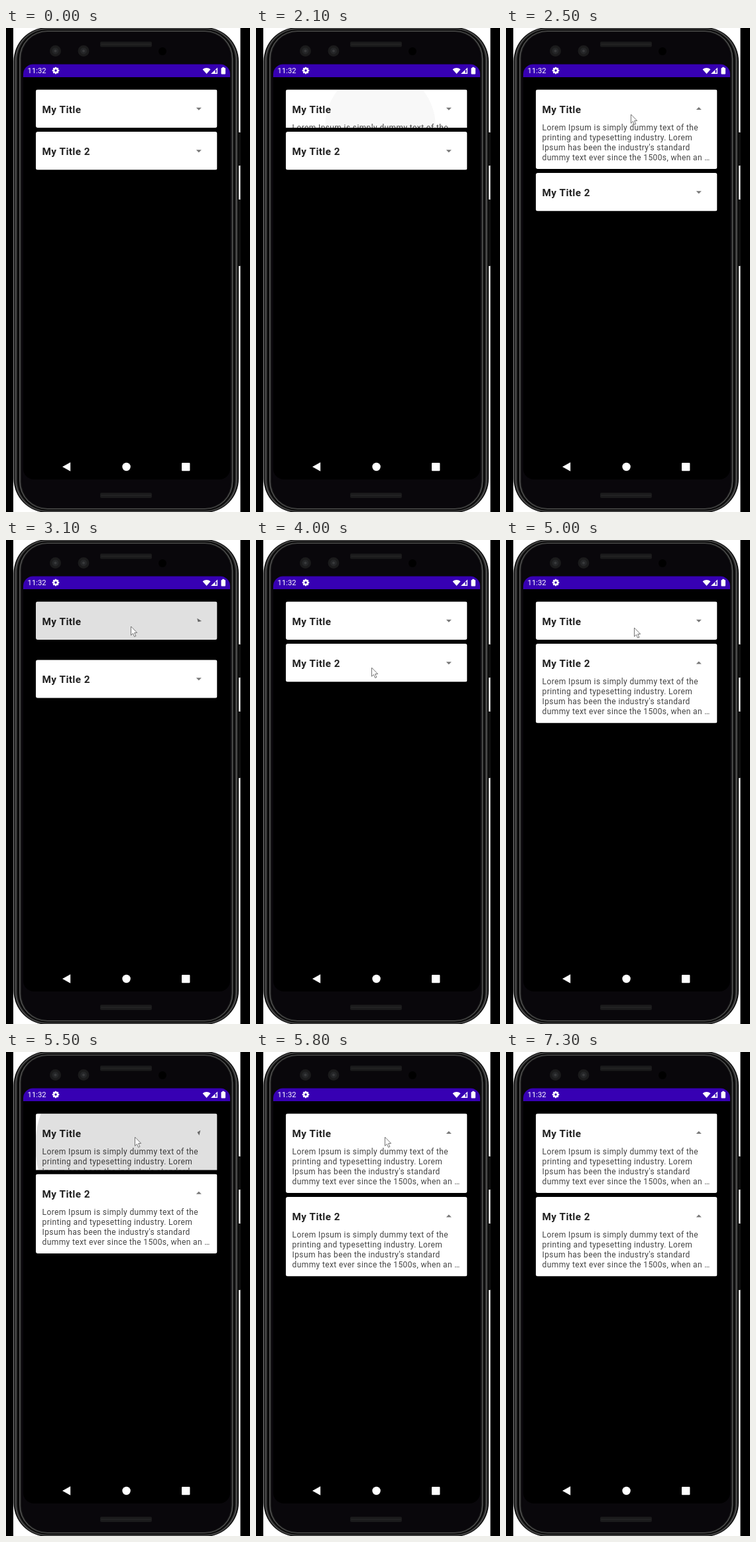
Animation, 368 px wide and 728 px high, one loop 7400 ms. Source, as an HTML page with a canvas:

```html
<!DOCTYPE html>
<html lang="en">
<head>
<meta charset="utf-8">
<title>Expandable cards</title>
<style>
  html, body { margin: 0; width: 100%; height: 100%; overflow: hidden; background: #000; }
  canvas { display: block; width: 368px; height: 728px; }
</style>
</head>
<body>
<canvas id="stage" width="368" height="728"></canvas>
<script>
const ctx = document.getElementById('stage').getContext('2d');
const LOOP = 7400, STEP = 100;
const LEFT = 45, WIDTH = 273.5, TOP = 92.5, SHORT = 57.5, TALL = 119.5, GAP = 6;
const LINES = [
  'Lorem Ipsum is simply dummy text of the',
  'printing and typesetting industry. Lorem',
  "Ipsum has been the industry's standard",
  'dummy text ever since the 1500s, when an …'
];
// Each tap: when the finger goes down, when it lets go, and where.
const CARDS = [
  { title: 'My Title', taps: [
    { down: 2082, up: 2100, x: 188, y: 146 },
    { down: 2880, up: 3018, x: 188, y: 130 },
    { down: 5380, up: 5450, x: 194, y: 128 }] },
  { title: 'My Title 2', taps: [
    { down: 4030, up: 4105, x: 174, y: 192 }] }
];
// Pointer path: time, x, y
const PATH = [
  [2200, 188, 130], [3500, 188, 130], [3900, 174, 192], [4700, 174, 192],
  [5000, 193, 132], [5200, 194, 128], [6100, 194, 128], [6300, 165, 150],
  [6450, 112, 200], [6600, 170, 247], [6800, 234, 230]
];

const clamp = v => Math.max(0, Math.min(1, v));
const mix = (a, b, k) => a + (b - a) * k;

function bezier(x1, y1, x2, y2) {
  const at = (a, b, s) => 3 * (1 - s) * (1 - s) * s * a + 3 * (1 - s) * s * s * b + s * s * s;
  return x => {
    if (x <= 0 || x >= 1) return clamp(x);
    let lo = 0, hi = 1;
    for (let i = 0; i < 24; i++) {
      const mid = (lo + hi) / 2;
      if (at(x1, x2, mid) < x) lo = mid; else hi = mid;
    }
    return at(y1, y2, lo);
  };
}
const slowIn = bezier(0, 0, 0.2, 1);
const fastOut = bezier(0.4, 0, 0.2, 1);
// Critically damped spring, from 0 to 1
const spring = ms => { const k = 0.0387 * ms; return 1 - (1 + k) * Math.exp(-k); };

function fillBox(x, y, w, h, r, fill) {
  ctx.beginPath();
  ctx.roundRect(x, y, w, h, r);
  ctx.fillStyle = fill;
  ctx.fill();
}
function disc(x, y, r, fill) {
  ctx.beginPath();
  ctx.arc(x, y, r, 0, Math.PI * 2);
  ctx.fillStyle = fill;
  ctx.fill();
}
function poly(points, fill) {
  ctx.beginPath();
  points.forEach(([x, y]) => ctx.lineTo(x, y));
  ctx.closePath();
  ctx.fillStyle = fill;
  ctx.fill();
}
function label(text, x, y, font, fill, spacing = 0) {
  ctx.font = font;
  ctx.letterSpacing = spacing + 'px';
  ctx.fillStyle = fill;
  ctx.fillText(text, x, y);
}

function drawPhone() {
  fillBox(0, 0, 368, 728, 0, '#000');
  fillBox(11, 0, 342.5, 728, 0, '#fff');
  fillBox(350, 157, 4, 50, 1, '#111');
  fillBox(350, 258, 4, 100, 1, '#111');
  // Rim, as nested shells from the outside in
  const shells = [[0, '#0c0c0c'], [2, '#4a4a4a'], [4.5, '#1c1c1c'], [6, '#080808'],
    [8.5, '#555'], [10, '#222'], [11.5, '#09070b']];
  for (const [d, fill] of shells) {
    fillBox(11.5 + d, -1 + d * 0.6, 339.5 - 2 * d, 730 - d * 1.2, 51 - d, fill);
  }
  for (const y of [20.5, 699]) {
    fillBox(142, y, 78, 8, 2, '#1a1a1b');
    fillBox(143, y + 3, 76, 2, 1, '#222223');
  }
  for (const x of [74.5, 117]) {
    disc(x, 34.5, 8.5, '#1b1b1c');
    disc(x, 34.5, 5, '#252628');
    disc(x, 34.5, 2, '#38393b');
  }
  disc(236, 35, 6, '#000');
  fillBox(26, 54.4, 312, 624.6, 16, '#000');
}

function drawStatus() {
  fillBox(26, 54.4, 312, 19.6, [15, 15, 0, 0], '#3700b3');
  label('11:32', 32.6, 68.4, '11.2px Roboto, sans-serif', '#fff');
  for (let i = 0; i < 4; i++) {
    ctx.save();
    ctx.translate(75, 64);
    ctx.rotate(i * Math.PI / 4);
    fillBox(-1.2, -5.2, 2.4, 10.4, 0.5, '#fff');
    ctx.restore();
  }
  disc(75, 64, 3.9, '#fff');
  disc(75, 64, 1.7, '#3700b3');
  ctx.beginPath();
  ctx.moveTo(302.5, 69);
  ctx.arc(302.5, 69, 9, -Math.PI * 0.73, -Math.PI * 0.27);
  ctx.closePath();
  ctx.fillStyle = '#fff';
  ctx.fill();
  poly([[309, 69], [319, 59.5], [319, 69]], '#fff');
  fillBox(315.5, 63, 2, 4.5, 0, '#3700b3');
  fillBox(324.5, 60, 6.5, 9.5, 1, '#fff');
  fillBox(326.2, 58.8, 3, 2, 0, '#fff');
}

function drawNav() {
  poly([[85, 660], [97.2, 653.3], [97.2, 666.7]], '#fff');
  disc(181.6, 660, 6.2, '#fff');
  fillBox(265, 654, 12.4, 12.2, 1, '#fff');
}

function cardState(card, t) {
  const done = card.taps.filter(tap => t >= tap.up);
  const open = done.length % 2 === 1;
  if (!done.length) return { open, slot: SHORT, angle: 0 };
  const age = t - done[done.length - 1].up;
  const [from, to] = open ? [0, 1] : [1, 0];
  return {
    open,
    slot: mix(SHORT, TALL, mix(from, to, slowIn(age / 300))),
    angle: Math.PI * mix(from, to, spring(age))
  };
}

function drawRipple(tap, t, y, h) {
  const age = t - tap.down;
  if (age < 0 || age > 375) return;
  const alpha = 0.12 * clamp(age / 75) * (1 - clamp((age - 225) / 150));
  const move = clamp(age / 225);
  const full = Math.hypot(WIDTH / 2, h / 2) + 8;
  disc(mix(tap.x, LEFT + WIDTH / 2, move), mix(tap.y, y + h / 2, move),
    mix(WIDTH * 0.3, full, fastOut(move)), `rgba(0,0,0,${alpha})`);
}

function drawCard(card, y, t) {
  const { open, slot, angle } = cardState(card, t);
  const h = open ? TALL : SHORT;
  ctx.save();
  ctx.beginPath();
  ctx.rect(LEFT, y, WIDTH, slot);
  ctx.clip();
  fillBox(LEFT, y, WIDTH, h, 3, '#fff');
  ctx.clip();
  label(card.title, 54.5, y + 35.3, 'bold 15.3px Roboto, sans-serif', '#222', 0.38);
  if (open) {
    LINES.forEach((line, i) =>
      label(line, 54.6, y + 61.4 + i * 15, '12px Roboto, sans-serif', '#444', 0.38));
  }
  ctx.save();
  ctx.translate(290.8, y + 28.8);
  ctx.rotate(angle);
  poly([[-4, -1.6], [4, -1.6], [0, 2.4]], '#777');
  ctx.restore();
  card.taps.forEach(tap => drawRipple(tap, t, y, h));
  ctx.restore();
  return y + slot + GAP;
}

function drawPointer(t) {
  const next = PATH.findIndex(p => p[0] > t);
  if (next < 1) return;
  const [a, b] = [PATH[next - 1], PATH[next]];
  const k = (t - a[0]) / (b[0] - a[0]);
  ctx.save();
  ctx.translate(mix(a[1], b[1], k) + 0.5, mix(a[2], b[2], k));
  poly([[0, 0], [0, 13.2], [3, 10.4], [5.2, 15.4], [7.4, 14.4], [5.2, 9.6], [9.2, 9.4]], '#fff');
  ctx.strokeStyle = '#666';
  ctx.lineWidth = 0.9;
  ctx.stroke();
  ctx.restore();
}

function draw(now) {
  const t = Math.floor((now % LOOP) / STEP) * STEP;
  drawPhone();
  drawStatus();
  drawNav();
  CARDS.reduce((y, card) => drawCard(card, y, t), TOP);
  drawPointer(t);
  requestAnimationFrame(draw);
}
requestAnimationFrame(draw);
</script>
</body>
</html>
```
